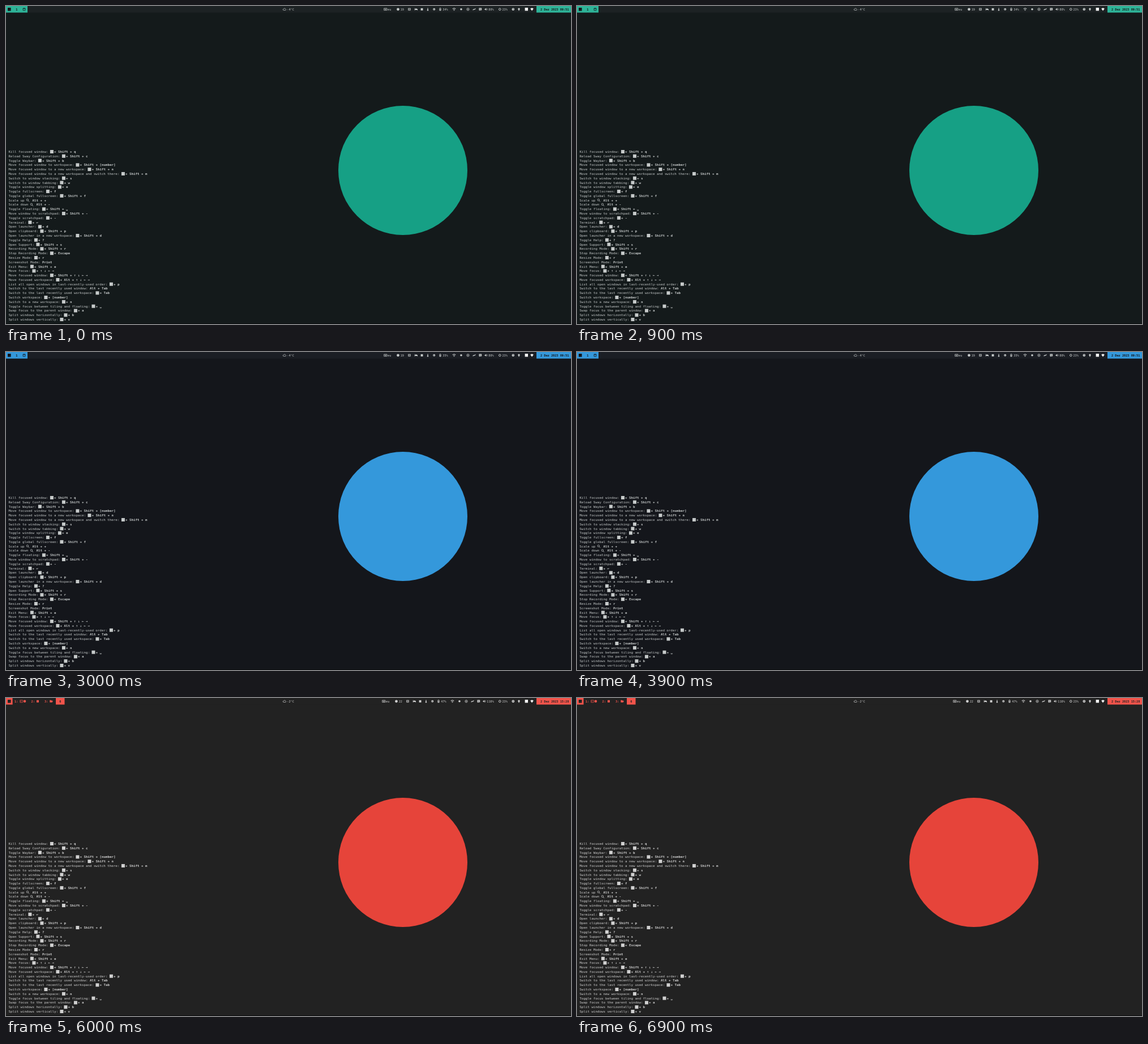
Animation, 998 px wide and 561 px high, one loop 7.5 s. Source, as an HTML page with a canvas:

```html
<!DOCTYPE html>
<html lang="en">
<head>
<meta charset="utf-8">
<title>Desktop themes</title>
<style>
html, body { margin: 0; width: 100%; height: 100%; overflow: hidden; background: #141a1b; }
canvas { display: block; }
</style>
</head>
<body>
<canvas id="stage" width="998" height="561"></canvas>
<script>
const ctx = document.getElementById('stage').getContext('2d');
const HOLD = 1500, MID = 5.8;

const morning = { temp: '-4°C', count: '19', volume: '80%', shift: 0 };
const afternoon = { temp: '-2°C', count: '22', volume: '110%', shift: -3, busy: true };
const themes = [
  { ...morning, bg: '#141a1b', bar: '#1d2224', accent: '#2eb398', mark: '#16a085', text: '#c6caca', battery: '34%', time: '09:51' },
  { ...afternoon, bg: '#141a1b', bar: '#222222', accent: '#9bc274', mark: '#8aad64', text: '#c6caca', battery: '46%', time: '15:28', alert: '#f0642d' },
  { ...morning, bg: '#14161b', bar: '#1b1e24', accent: '#3498db', mark: '#3498db', text: '#c6caca', battery: '35%', time: '09:51' },
  { ...morning, bg: '#141a1b', bar: '#21212b', accent: '#6f5596', mark: '#bd93f9', text: '#f0f0ea', battery: '35%', time: '09:52', signal: '#6593d8' },
  { ...afternoon, bg: '#222222', bar: '#222222', accent: '#f2544b', mark: '#e6443a', text: '#d0d0d0', battery: '47%', time: '15:28' }
];

// "|" starts the bold keys, "@" is the modifier key, "~" a magnifier
const help = `Kill focused window: |@+ Shift + q
Reload Sway Configuration: |@+ Shift + c
Toggle Waybar: |@+ Shift + b
Move focused window to workspace: |@+ Shift + [number]
Move focused window to a new workspace: |@+ Shift + n
Move focused window to a new workspace and switch there: |@+ Shift + m
Switch to window stacking: |@+ s
Switch to window tabbing: |@+ w
Toggle window splitting: |@+ e
Toggle fullscreen: |@+ f
Toggle global fullscreen: |@+ Shift + f
Scale up ~ |Alt + +
Scale down ~ |Alt + -
Toggle floating: |@+ Shift + ␣
Move window to scratchpad: |@+ Shift + -
Toggle scratchpad: |@+ -
Terminal: |@+ ↩
Open launcher: |@+ d
Open clipboard: |@+ Shift + p
Open launcher in a new workspace: |@+ Shift + d
Toggle Help: |@+ ?
Open Support: |@+ Shift + s
Recording Mode: |@+ Shift + r
Stop Recording Mode: |@+ Escape
Resize Mode: |@+ r
Screenshot Mode: |Print
Exit Menu: |@+ Shift + e
Move focus: |@+ ↑ ↓ ← →
Move focused window: |@+ Shift + ↑ ↓ ← →
Move focused workspace: |@+ Alt + ↑ ↓ ← →
List all open windows in last-recently-used order: |@+ p
Switch to the last recently used window: |Alt + Tab
Switch to the last recently used workspace: |@+ Tab
Switch workspace: |@+ [number]
Switch to a new workspace: |@+ n
Toggle focus between tiling and floating: |@+ ␣
Swap focus to the parent window: |@+ a
Split windows horizontally: |@+ b
Split windows vertically: |@+ v`.split('\n');

// Text is drawn large and scaled down so that the cell width stays exact
function write(text, x, y, cell, color, weight = 'normal') {
  ctx.save();
  ctx.translate(x, y);
  ctx.scale(cell / 14, cell / 14);
  ctx.font = `${weight} 23.25px "DejaVu Sans Mono", monospace`;
  ctx.fillStyle = color;
  ctx.fillText(text, 0, 0);
  ctx.restore();
}

function rect(x, y, w, h, color) {
  ctx.fillStyle = color;
  ctx.fillRect(x, y, w, h);
}

function dot(x, y, r, color) {
  ctx.fillStyle = color;
  ctx.beginPath();
  ctx.arc(x, y, r, 0, 7);
  ctx.fill();
}

function ring(x, y, r, color, width = 0.9) {
  ctx.strokeStyle = color;
  ctx.lineWidth = width;
  ctx.beginPath();
  ctx.arc(x, y, r, 0, 7);
  ctx.stroke();
}

function line(x, path, color, width = 0.9) {
  ctx.save();
  ctx.translate(x, MID);
  ctx.strokeStyle = color;
  ctx.lineWidth = width;
  ctx.stroke(new Path2D(path));
  ctx.restore();
}

function shape(x, path, color) {
  ctx.save();
  ctx.translate(x, MID);
  ctx.fillStyle = color;
  ctx.fill(new Path2D(path));
  ctx.restore();
}

function drawHelp(color) {
  const cell = 3.5;
  help.forEach((entry, i) => {
    const [label, keys] = entry.split('|');
    const y = 259 + i * 7.79, keyX = 4.4 + label.replace('~', '  ').length * cell;
    write(label.replace('~', '  '), 4.4, y, cell, color);
    write(keys.replace('@', '  '), keyX, y, cell, color, 'bold');
    if (keys[0] === '@') rect(keyX, y - 5, 6, 6, color);
    if (label.includes('~')) {
      ring(keyX - 8.5, y - 2.6, 1.7, color, 0.7);
      line(keyX - 7.3, `M0 ${y - 1.4 - MID} l2 2`, color, 0.8);
    }
  });
}

function drawWorkspaces(t) {
  const label = (text, x, color = t.accent) => write(text, x, 7.7, 3.15, color, 'bold');
  if (!t.busy) {
    rect(0, 0, 38, 11.6, t.accent);
    label('1', 17.3, t.bg);
    line(32, 'M-1.9 -1.8 h3.8 v3.8 h-3.8 z M-1.9 -1.4 h3.8', t.bg, 0.8);
  } else {
    rect(0, 0, 11.6, 11.6, t.accent);
    label('1:', 15, t.accent);
    line(27, 'M-2.2 -2 h4.6 v4 h-4.6 z M-1.2 -.8 l1.1 .9 l-1.1 .9', t.accent, 0.7);
    dot(33, MID, 2.3, t.accent);
    label('2:', 44.6);
    rect(54, MID - 2, 4, 4, t.accent);
    label('3:', 68);
    shape(80, 'M-2.7 -2 h2 l.7 .7 h2 v.8 h.9 l-1.2 2.5 h-4.4 z', t.accent);
    rect(88, 0, 15.5, 11.6, t.accent);
    label('6', 94.2, t.bg);
  }
  rect(3, 3, 5.6, 5.6, t.bg);
}

function drawStatus(t) {
  const c = t.text, s = t.shift;
  const label = (text, x) => write(text, x, 7.7, 3.15, c);
  line(492, 'M-1.8 1.7 h3.6 a1.1 1.1 0 0 0 0 -2.1 a1.7 1.7 0 0 0 -3.2 -.3 a1.2 1.2 0 0 0 -.4 2.4', c, 0.7);
  label(t.temp, 496.3);

  line(670.3 + s, 'M-2.7 -1.8 h5.4 v3.6 h-5.4 z M-1.8 -.6 h3.6 M-1.3 .8 h2.6', c, 0.7);
  label('eu', 674 + s);
  dot(692.5 + s, MID, 2.4, c);
  label(t.count, 696.7 + s);
  line(712.5 + s, 'M-2.2 -1.7 h4.4 M-1.8 0 h3.6 M-1.8 1.8 h3.6 M-1.8 -1.7 v3.5 M1.8 -1.7 v3.5', c, 0.8);
  shape(724.5 + s, 'M-2.8 -2 h.7 v2 h.5 v-1.2 h2.4 l1.7 1 v2.2 h-.7 v-.8 h-3.9 v.8 h-.7 z', c);
  rect(732.6 + s, MID - 1.9, 3.9, 3.9, t.alert || c);
  line(745 + s, 'M0 -2.4 v3', c, 1.2);
  dot(745 + s, MID + 1.4, 1.2, c);
  ring(756.2 + s, MID, 1.5, c, 1.1);
  dot(756.2 + s, MID, 0.8, c);
  line(767 + s, 'M-1.2 -1.7 h2.4 v3.8 h-2.4 z M-.5 -2.4 h1', c, 0.8);
  rect(766.1 + s, MID, 1.8, 1.8, c);
  label(t.battery, 771.3 + s);
  line(791.5 + s, 'M-2.9 -.9 q2.9 -2.5 5.8 0 M-1.7 .5 q1.7 -1.5 3.4 0', c, 1);
  dot(791.5 + s, MID + 1.7, 0.8, c);
  dot(804 + s, MID, 1.8, c);
  ring(816 + s, MID, 2.2, c, 0.7);
  ring(816 + s, MID, 1, c, 0.6);
  line(827 + s, 'M-2.4 1.4 l1.7 -1.5 l1.4 .4 l1.7 -1.8', c, 1.2);
  shape(837.8 + s, 'M-2.4 -2.4 h4.8 v4 h-3 l-1.1 1 v-1 h-.7 z', c);
  rect(836.6 + s, MID - 0.8, 2.4, 0.7, t.bar);
  shape(847.7 + s, 'M-2.3 -.8 h1.1 l1.6 -1.5 v4.6 l-1.6 -1.5 h-1.1 z', c);
  line(848.5 + s, 'M0 -1 q1 1 0 2 M.9 -1.9 q1.8 1.9 0 3.8', c, 0.6);
  label(t.volume, 852.3 + s);

  ring(872.3, MID, 1.8, c, 1);
  label('23%', 876.4);
  if (t.busy) {
    ring(895.8, MID, 1.6, c, 1.6);
  } else {
    dot(895.8, MID, 2.3, c);
    line(895.8, 'M0 -1.4 v1.5 h1', t.bar, 0.6);
  }
  dot(906, MID - 0.6, 1.7, c);
  rect(905.2, MID + 0.8, 1.6, 1.6, c);
  rect(916.6, 3, 5.4, 5.4, '#f4f4f4');
  if (t.signal) {
    for (let i = 0; i < 4; i++) rect(926.5 + i * 1.5, 7 - i * 1.2, 1.1, 1.3 + i * 1.2, t.signal);
  } else {
    shape(929, 'M-2.8 -1.1 q2.8 -2.4 5.6 0 L0 2.8 z', '#f4f4f4');
  }
}

function draw(t) {
  rect(0, 0, 998, 561, t.bg);
  rect(0, 560, 998, 1, '#0a0d0e');
  rect(0, 0, 998, 11.6, t.bar);
  drawWorkspaces(t);
  drawStatus(t);
  rect(937, 0, 61, 11.6, t.accent);
  write(`2 Dez 2023 ${t.time}`, 944, 7.7, 3.15, t.bg, 'bold');
  dot(701, 290, 114, t.mark);
  drawHelp(t.text);
}

const start = performance.now();
let shown = -1;
function tick() {
  const index = Math.floor((performance.now() - start) / HOLD) % themes.length;
  if (index !== shown) draw(themes[shown = index]);
  requestAnimationFrame(tick);
}
tick();
</script>
</body>
</html>
```
